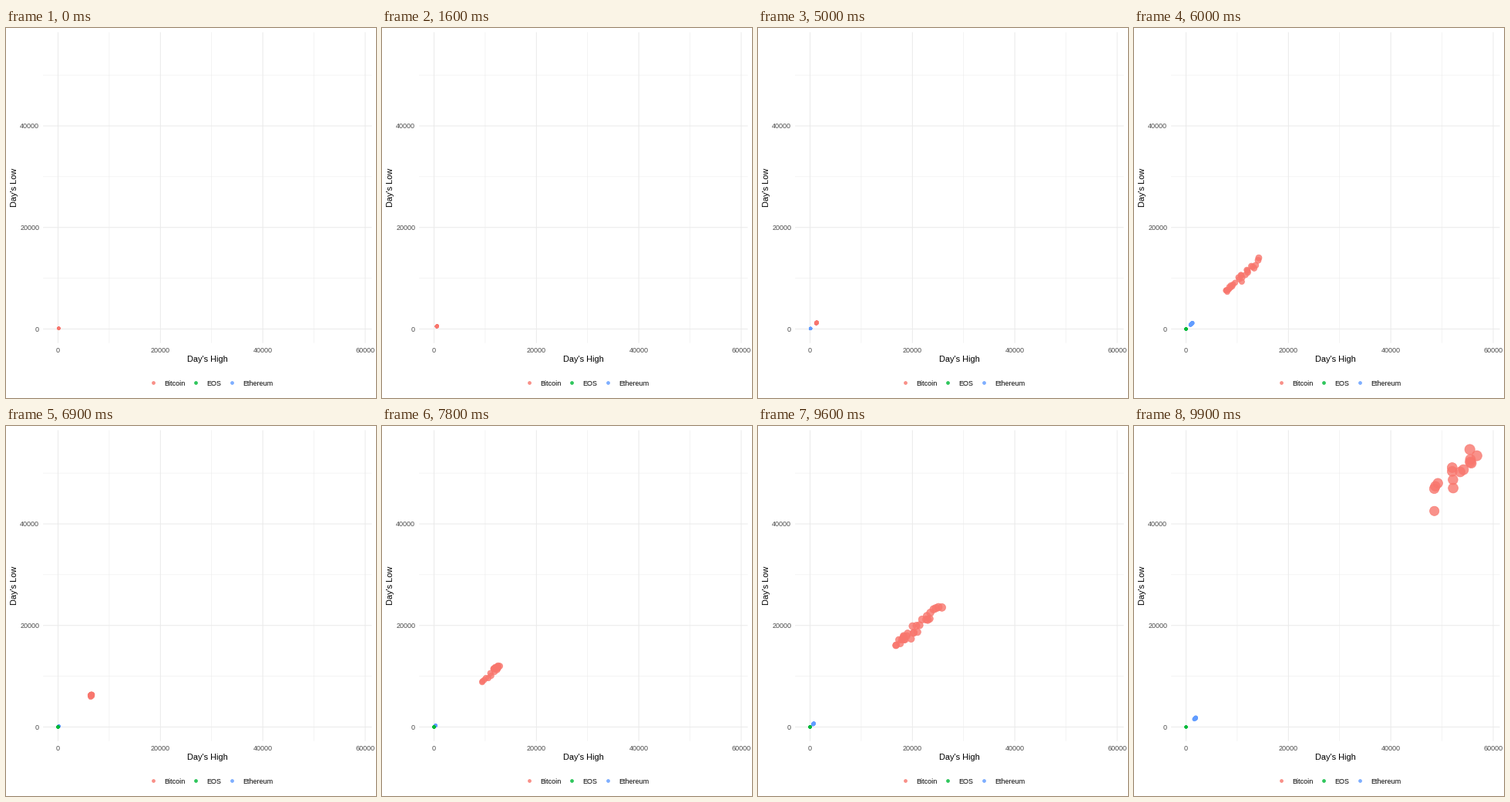
A matplotlib script that plays this animation: 480 by 480 pixels, repeating every 10 s.

```python
import numpy as np
import matplotlib.pyplot as plt
from matplotlib.animation import FuncAnimation

SIZE, DPI, FRAMES, INTERVAL = 480, 72, 100, 100
DAYS = 2861                       # first to last trading day
PER_FRAME = DAYS / (FRAMES - 1)
TOP = 58330                       # highest price
RED, GREEN, BLUE = "#F8766D", "#00BA38", "#619CFF"
GRID, GREY = "#EBEBEB", "#4D4D4D"
ALPHA = 0.8

plt.rcParams["font.family"] = "Liberation Sans"

# Main turning points of each price: (day, value)
BTC = [
    (0, 130), (155, 125), (213, 1030), (355, 480), (430, 620), (612, 290),
    (850, 230), (1343, 960), (1463, 1300), (1587, 4500), (1599, 3500),
    (1692, 18200), (1720, 13700), (1744, 7600), (1771, 10800), (1798, 7200),
    (1832, 9300), (1887, 6300), (2020, 6400), (2055, 3500), (2163, 4200),
    (2240, 9200), (2249, 12200), (2306, 10300), (2423, 7000), (2482, 9900),
    (2511, 5400), (2558, 9000), (2623, 9300), (2668, 11700), (2704, 10500),
    (2772, 18700), (2811, 38500), (2830, 32000), (2846, 47000),
    (2855, 56500), (2861, 46500),
]
ETH = [
    (831, 1), (1343, 8), (1505, 340), (1540, 190), (1660, 300), (1720, 1250),
    (1798, 400), (1832, 780), (1950, 220), (2054, 90), (2249, 300),
    (2423, 130), (2772, 590), (2855, 1900), (2861, 1500),
]
EOS = [(1525, 4), (DAYS, 4)]


def px(v):
    return 67.5 + np.asarray(v) * 0.0066417


def py(v):
    return 390.5 - np.asarray(v) * 0.0065875


def area(size):
    return (0.75 * (size * 2.845 + 0.945)) ** 2


def series(knots, seed):
    """Frame number, position and area of one dot per trading day."""
    rng = np.random.default_rng(seed)
    days, vals = np.array(knots).T
    day = np.arange(days[0], DAYS + 1)
    log = np.interp(day, days, np.log(vals)) + rng.normal(0, 0.018, day.size)
    prev = np.r_[log[0], log[:-1]]
    wick = 0.012 + 0.3 * np.abs(log - prev)
    up, down = rng.exponential(0.7, (2, day.size)) * wick
    high = np.minimum(np.exp(np.maximum(log, prev) + up), TOP)
    low = np.exp(np.minimum(log, prev) - down)
    step = np.rint(day / PER_FRAME).astype(int)
    size = 1 + 5 * np.sqrt(np.minimum(np.exp(log) / TOP, 1))
    return step, np.c_[px(high), py(low)], area(size)


fig = plt.figure(figsize=(SIZE / DPI, SIZE / DPI), dpi=DPI, facecolor="white")
ax = fig.add_axes([0, 0, 1, 1])
ax.set(xlim=(0, SIZE), ylim=(SIZE, 0))
ax.axis("off")


def line(xs, ys, width):
    ax.plot(xs, ys, color=GRID, lw=width, snap=False,
            solid_capstyle="butt", zorder=1)


def label(x, y, text, size=9, color="black", ha="center", **kw):
    ax.text(x, y, text, size=size, color=color, ha=ha, va="baseline", **kw)


def dots(color, z):
    return ax.scatter([], [], marker="o", color=color, alpha=ALPHA,
                      linewidths=0.71, zorder=z)


for v in range(0, 60001, 10000):
    major = v % 20000 == 0
    width = 1.07 if major else 0.53
    line([px(v)] * 2, [5.5, 408.7], width)
    if major:
        label(px(v), 421, str(v), color=GREY)
    if v < 60000:
        line([48.1, 474.5], [py(v)] * 2, width)
        if major:
            label(43.1, py(v) + 3.3, str(v), color=GREY, ha="right")

label(261.3, 433, "Day's High", size=11)
label(13.8, 207, "Day's Low", size=11, rotation=90, rotation_mode="anchor")

for x, name, color in [(191.3, "Bitcoin", RED), (245.5, "EOS", GREEN),
                       (292.8, "Ethereum", BLUE)]:
    key = dots(color, 3)
    key.set_offsets([(x, 460.2)])
    key.set_sizes([area(1.5)])
    label(x + 14.3, 463.8, name, ha="left")

coins = [
    (dots(RED, 4), series(BTC, 1)),
    (dots(BLUE, 5), series(ETH, 2)),
    (dots(GREEN, 6), series(EOS, 3)),
]


def draw(i):
    for cloud, (step, pos, areas) in coins:
        now = step == i
        cloud.set_offsets(pos[now])
        cloud.set_sizes(areas[now])
    return [cloud for cloud, _ in coins]


anim = FuncAnimation(fig, draw, frames=FRAMES, interval=INTERVAL,
                     repeat=True, repeat_delay=0, blit=False)
plt.show()
```
